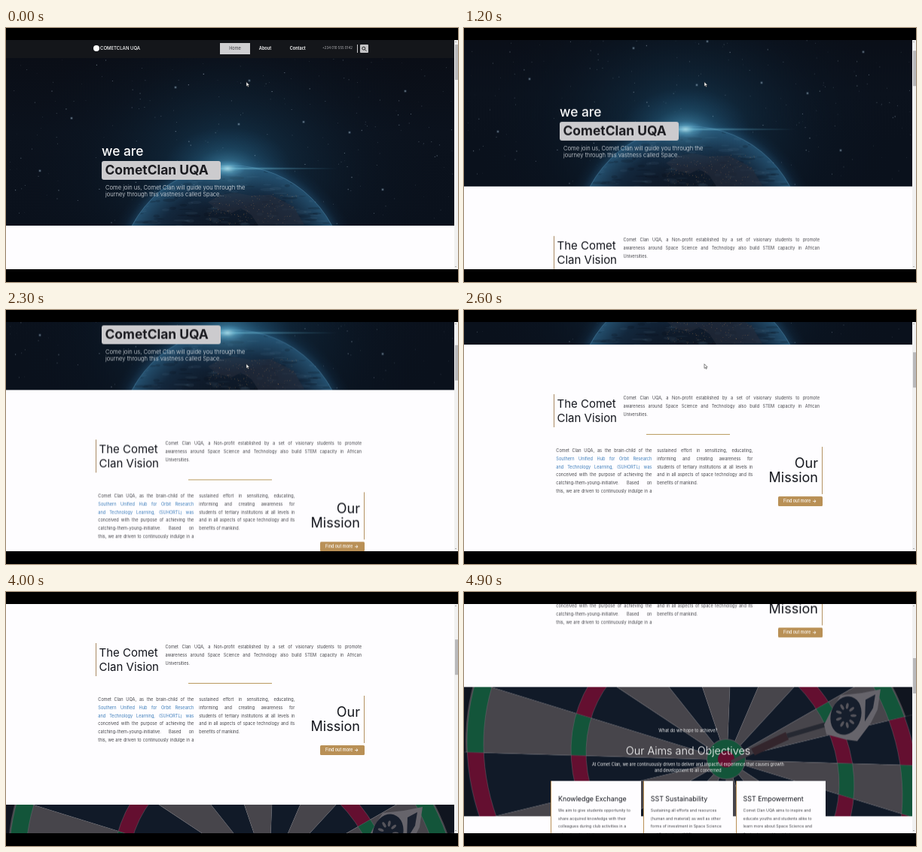
Write an HTML page with a canvas that moves like this. It is 600 by 338 pixels and loops after 5 s.

```html
<!DOCTYPE html>
<html lang="en">
<head>
<meta charset="utf-8">
<title>CometClan UQA</title>
<style>
html, body { margin: 0; width: 100%; height: 100%; overflow: hidden; background: #000; }
#view { position: absolute; left: 0; top: 16px; width: 600px; height: 305px; overflow: hidden; background: #fefdff; }
#page { position: absolute; left: 0; top: -16px; width: 595px; height: 800px; will-change: transform; }
#page > * { position: absolute; }
#page span { white-space: pre; font-family: Inter, "Open Sans", sans-serif; }
#bar { position: absolute; left: 595px; top: 0; width: 5px; height: 305px; background: #f1f1f1; }
#thumb { position: absolute; left: .5px; top: 5.5px; width: 4px; height: 47.5px; background: #b9b9bb; }
.tip { position: absolute; left: 1px; border: 1.5px solid transparent; }
#cursor { position: absolute; left: 318px; top: 71px; }
</style>
</head>
<body>
<div id="view">
  <div id="page"></div>
  <div id="bar">
    <div id="thumb"></div>
    <i class="tip" style="top:1px;border-bottom-color:#666"></i>
    <i class="tip" style="top:301px;border-top-color:#666"></i>
  </div>
</div>
<svg id="cursor" width="7" height="9" viewBox="0 0 7 9">
  <path d="M1 .8V6.6L2.4 5.4L3.3 7.5L4.3 7L3.4 5H5.2Z" fill="#fff" stroke="#333" stroke-width=".6"/>
</svg>
<script>
const page = document.getElementById('page');
const thumb = document.getElementById('thumb');
const cursor = document.getElementById('cursor');
const TAN = '#b99056', INK = '#12141b', BODY = '#444449';

function random(seed) {
  return () => (seed = (seed * 16807) % 2147483647) / 2147483647;
}

function box(x, y, w, h, color, radius = 0) {
  const el = document.createElement('div');
  el.style.cssText = `left:${x}px;top:${y}px;width:${w}px;height:${h}px;background:${color};border-radius:${radius}px`;
  page.append(el);
}

// y is the baseline; x is the left, middle or right edge according to align
function text(str, x, y, size, color, { weight = 400, align = 'left', justify = 0 } = {}) {
  const el = document.createElement('span');
  el.textContent = str;
  el.style.cssText = `left:${x}px;top:${y - 1.364 * size}px;font-size:${size}px;line-height:${2 * size}px;color:${color};font-weight:${weight}`;
  if (align === 'center') el.style.transform = 'translateX(-50%)';
  if (align === 'right') el.style.transform = 'translateX(-100%)';
  if (justify) {
    el.style.width = justify + 'px';
    el.style.textAlignLast = 'justify';
    el.style.whiteSpace = 'normal';
  }
  page.append(el);
}

function lines(list, x, y, step, size, width, links = []) {
  list.forEach((str, i) => {
    const last = str.endsWith('.');
    text(str, x, y + i * step, size, links.includes(i) ? '#3b7cba' : BODY, { justify: last ? 0 : width });
  });
}

function canvas(y, h) {
  const el = document.createElement('canvas');
  el.width = 595;
  el.height = h;
  el.style.cssText = `left:0;top:${y}px`;
  page.append(el);
  return el.getContext('2d');
}

function poly(c, pts, color) {
  c.fillStyle = color;
  c.beginPath();
  for (let i = 0; i < pts.length; i += 2) c.lineTo(pts[i], pts[i + 1]);
  c.closePath();
  c.fill();
}

function disc(c, x, y, rx, ry, color, turn = 0) {
  c.fillStyle = color;
  c.beginPath();
  c.ellipse(x, y, rx, ry, turn, 0, 7);
  c.fill();
}

// a soft ellipse shaded from its middle to its edge
function glow(c, x, y, rx, ry, inner, ...stops) {
  c.save();
  c.translate(x, y);
  c.scale(1, ry / rx);
  const g = c.createRadialGradient(0, 0, inner, 0, 0, rx);
  stops.forEach((s, i) => g.addColorStop(i / (stops.length - 1), s));
  disc(c, 0, 0, rx, rx, g);
  c.restore();
}

function drawHero() {
  const c = canvas(16, 247), rnd = random(77);
  c.translate(0, -16);
  const sky = c.createLinearGradient(0, 16, 0, 263);
  sky.addColorStop(0, '#0a0d15');
  sky.addColorStop(.5, '#0b121d');
  sky.addColorStop(1, '#0a111c');
  c.fillStyle = sky;
  c.fillRect(0, 16, 595, 247);
  glow(c, 296, 187, 280, 230, 0, 'rgba(32,92,128,.6)', 'rgba(22,62,90,.34)', 'rgba(14,36,56,.15)', 'rgba(10,20,34,0)');

  for (let i = 0; i < 230; i++) {
    const s = .4 + rnd() * .8;
    c.fillStyle = `rgba(190,208,225,${.15 + rnd() * .45})`;
    c.fillRect(rnd() * 595, 40 + rnd() * 223, s, s);
  }
  for (const [x, y] of [[309, 128], [225, 79], [456, 139], [323, 70], [395, 125], [87, 120], [530, 84], [500, 215], [45, 190]]) {
    disc(c, x, y, 2, 2, 'rgba(130,170,200,.2)');
    disc(c, x, y, .7, .7, 'rgba(215,230,240,.75)');
  }

  // atmosphere and globe
  glow(c, 300, 333, 172, 172, 148, 'rgba(46,110,155,.4)', 'rgba(28,74,112,.13)', 'rgba(20,50,80,0)');
  glow(c, 300, 333, 150, 150, 60, '#0d1622', '#0f1b2b', '#13273c', '#24506f');
  c.save();
  c.beginPath();
  c.arc(300, 333, 149, 0, 7);
  c.clip();
  for (let i = 0; i < 160; i++) {
    const x = 165 + rnd() * 270, y = 190 + rnd() * 75;
    disc(c, x, y, 2 + rnd() * 9, .6 + rnd() * 1.8, rnd() < .55 ? 'rgba(120,150,172,.08)' : 'rgba(5,10,20,.2)');
  }
  poly(c, [268, 232, 284, 222, 304, 219, 325, 223, 352, 222, 382, 238, 396, 262, 335, 263, 326, 249, 312, 240, 300, 246, 282, 242], 'rgba(40,47,60,.55)');
  for (let i = 0; i < 170; i++) {
    const x = 268 + rnd() * 118, y = 221 + rnd() * 40;
    c.fillStyle = `rgba(205,150,95,${.12 + rnd() * .4})`;
    c.fillRect(x, y, .8, .8);
  }
  c.restore();
  c.strokeStyle = 'rgba(95,155,190,.4)';
  c.beginPath();
  c.arc(300, 333, 150, Math.PI, 0);
  c.stroke();

  // sunrise and flare
  glow(c, 294, 187, 85, 55, 0, 'rgba(100,180,210,.5)', 'rgba(55,130,170,.18)', 'rgba(40,100,150,0)');
  glow(c, 294, 187, 24, 11, 0, 'rgba(200,235,242,.85)', 'rgba(110,190,220,.35)', 'rgba(80,160,210,0)');
  glow(c, 315, 187, 130, 2, 0, 'rgba(130,210,232,.5)', 'rgba(90,180,215,0)');
}

function drawHeader() {
  box(0, 16, 595, 23.5, '#14161a');
  box(115.5, 23.3, 8, 8, '#fff', 4);
  text('COMETCLAN UQA', 125, 29.6, 6, '#fff', { weight: 500 });
  box(284, 20.3, 40, 14.5, '#cfcfd1');
  text('Home', 304, 29.7, 5.6, '#3a3a3e', { align: 'center' });
  text('About', 344, 29.7, 5.6, '#fff', { align: 'center', weight: 600 });
  text('Contact', 387.3, 29.7, 5.5, '#fff', { align: 'center', weight: 600 });
  text('+234 010 555 0142', 420, 29, 4.4, '#b8b8bc');
  box(466, 22, 1, 10.5, '#c8c8ca');
  box(470, 22.3, 10.5, 10.5, '#c4c4c6', 1);
  const lens = canvas(16, 24);
  lens.strokeStyle = '#222';
  lens.beginPath();
  lens.arc(474.8, 11.1, 2, 0, 7);
  lens.moveTo(476.3, 12.6);
  lens.lineTo(478.3, 14.6);
  lens.stroke();
}

function drawIntro() {
  text('we are', 127, 170.3, 17.4, '#fff', { weight: 500 });
  box(127, 177, 158, 24.8, '#cccbce', 3);
  text('CometClan UQA', 131.5, 195.6, 17.4, '#1c1c21', { weight: 700 });
  text('Come join us, Comet Clan will guide you through the', 132, 215, 7.6, '#e2e6ea', { weight: 300 });
  text('journey through this vastness called Space...', 132, 224, 7.6, '#e2e6ea', { weight: 300 });
}

function drawVision() {
  box(119, 328.5, 1.3, 44, '#a98a63');
  text('The Comet', 123.5, 347.3, 15, INK);
  text('Clan Vision', 123.5, 366.3, 15, INK);
  lines(['Comet Clan UQA, a Non-profit established by a set of visionary students to promote',
    'awareness around Space Science and Technology also build STEM capacity in African',
    'Universities.'], 211.5, 336.6, 11, 5.6, 260.5);
  box(242, 381.9, 111, 1.3, '#b99a5e');
  lines(['Comet Clan UQA, as the brain-child of the', 'Southern Unified Hub for Orbit Research',
    'and Technology Learning, (SUHORTL) was', 'conceived with the purpose of achieving the',
    'catching-them-young-initiative. Based on', 'this, we are driven to continuously indulge in a'],
    122.3, 406.4, 10.9, 5.6, 127, [1, 2]);
  lines(['sustained effort in sensitizing, educating,', 'informing and creating awareness for',
    'students of tertiary institutions at all levels in', 'and in all aspects of space technology and its',
    'benefits of mankind.'], 256.3, 406.4, 10.9, 5.6, 127);
  text('Our', 470, 427.3, 18, INK, { align: 'right' });
  text('Mission', 470, 446.3, 18, INK, { align: 'right' });
  box(474.6, 399, 1.4, 62.5, '#b39263');
  box(417, 464.5, 59, 13.5, TAN, 1.5);
  text('Find out more', 424, 473.3, 5.5, '#fff', { weight: 500 });
  text('→', 462.3, 473.3, 6, '#fff', { weight: 700 });
}

function drawBoard() {
  const c = canvas(543.5, 172), cx = 349, cy = 97, tilt = Math.PI / 4;
  const NAVY = '#111a28', GREY = '#47454b', GREEN = '#13553a', RED = '#640f30', WIRE = 'rgba(120,116,122,.4)';
  const ray = k => {
    const a = (182 + 18 * k) * Math.PI / 180;
    return [cx + Math.cos(a) * 700, cy + Math.sin(a) * 595];
  };
  const sectors = (even, odd) => {
    for (let k = 0; k < 20; k++) poly(c, [cx, cy, ...ray(k), ...ray(k + 1)], k % 2 ? odd : even);
  };
  // the camera looks from one side, so rings lean and drift off the bull
  const oval = (x, y, r) => {
    c.moveTo(x, y);
    c.ellipse(x, y, r * 1.06, r * .936, tilt, 0, 7);
  };
  const ring = (x, y, r, w) => {
    c.save();
    c.beginPath();
    oval(x, y, r + w);
    oval(x, y, r - w);
    c.clip('evenodd');
    sectors(GREEN, RED);
    c.restore();
    c.strokeStyle = WIRE;
    for (const d of [-w, w]) {
      c.beginPath();
      c.ellipse(x, y, (r + d) * 1.06, (r + d) * .936, tilt, 0, 7);
      c.stroke();
    }
  };
  sectors(GREY, NAVY);
  c.save();
  c.beginPath();
  c.rect(0, 0, 595, 172);
  oval(304, 110, 302);
  c.clip('evenodd');
  c.fillStyle = '#10151f';
  c.fillRect(0, 0, 595, 172);
  c.restore();
  ring(304, 110, 289, 11);
  ring(330, 108, 178, 10);
  c.strokeStyle = WIRE;
  c.lineWidth = .7;
  for (let k = 0; k < 20; k++) {
    c.beginPath();
    c.moveTo(cx, cy);
    c.lineTo(...ray(k));
    c.stroke();
  }
  disc(c, 348, 96, 26, 27, '#55535a');
  disc(c, 348, 96, 25, 26, GREEN);
  disc(c, 348, 96, 11, 11, RED);

  // dart
  poly(c, [354, 98, 383, 82, 386, 88, 356, 102], '#403c43');
  poly(c, [381, 82, 427, 60, 431, 70, 386, 91], '#33252c');
  poly(c, [428, 62, 486, 45, 487, 51, 430, 68], '#262932');
  poly(c, [478, 50, 487, 32, 500, 11, 528, 8, 553, 3, 549, 30, 540, 48, 522, 72, 507, 70, 481, 63], '#66646b');
  poly(c, [533, 17, 546, 10, 543, 28, 532, 46], '#1b2230');
  disc(c, 507, 38, 20, 26, '#161e2c', .3);
  for (let i = 0; i < 9; i++) {
    const a = i * Math.PI * 2 / 9;
    disc(c, 507 + Math.cos(a) * 10, 38 + Math.sin(a) * 13, 4, 1.8, '#55545b', a);
  }
}

function drawAims() {
  const mid = { align: 'center' };
  text('What do we hope to achieve?', 297.3, 604.6, 5.6, '#eee', mid);
  text('Our Aims and Objectives', 297.5, 635, 14.4, '#fff', { align: 'center', weight: 300 });
  text('At Comet Clan, we are continuously driven to deliver and impactful experience that causes growth', 297.3, 649.6, 5.5, '#f2f2f2', mid);
  text('and development to all concerned', 297.3, 657.6, 5.5, '#f2f2f2', mid);
  const cards = [
    ['Knowledge Exchange', 'We aim to give students opportunity to', 'share acquired knowledge with their',
      'colleagues during club activities in a', 'educational institution'],
    ['SST Sustainability', 'Sustaining all efforts and resources', '(human and material) as well as other',
      'forms of investment in Space Science', 'and Technology (SST)'],
    ['SST Empowerment', 'Comet Clan UQA aims to inspire and', 'educate youths and students alike to',
      'learn more about Space Science and', 'Technology and be able to']
  ];
  cards.forEach(([title, ...body], i) => {
    const x = 115 + i * 122.8;
    box(x, 668.7, 119.6, 110, '#fefdff');
    box(x, 668.7, 1.2, 110, TAN);
    text(title, x + 10, 696.3, 8.9, INK);
    body.forEach((str, j) => text(str, x + 10, 710.6 + j * 10.4, 5.25, BODY));
  });
}

drawHero();
drawHeader();
drawIntro();
drawVision();
drawBoard();
drawAims();

// each wheel notch moves the page by the same eased distance
const LOOP = 5000, NOTCH = 52.2, GLIDE = 200;
const notches = [900, 1600, 2050, 2300, 2550, 4150, 4450, 4700];

function scrollAt(t) {
  return notches.reduce((sum, start) => {
    const p = Math.min(1, Math.max(0, (t - start) / GLIDE));
    return sum + NOTCH * p * p * (3 - 2 * p);
  }, 0);
}

const begin = performance.now();
function frame() {
  const t = Math.floor((performance.now() - begin) % LOOP / 100) * 100;
  const y = scrollAt(t);
  page.style.transform = `translateY(${-y}px)`;
  thumb.style.transform = `translateY(${y * .158}px)`;
  cursor.style.visibility = t < 2700 ? 'visible' : 'hidden';
  requestAnimationFrame(frame);
}
frame();
</script>
</body>
</html>
```
